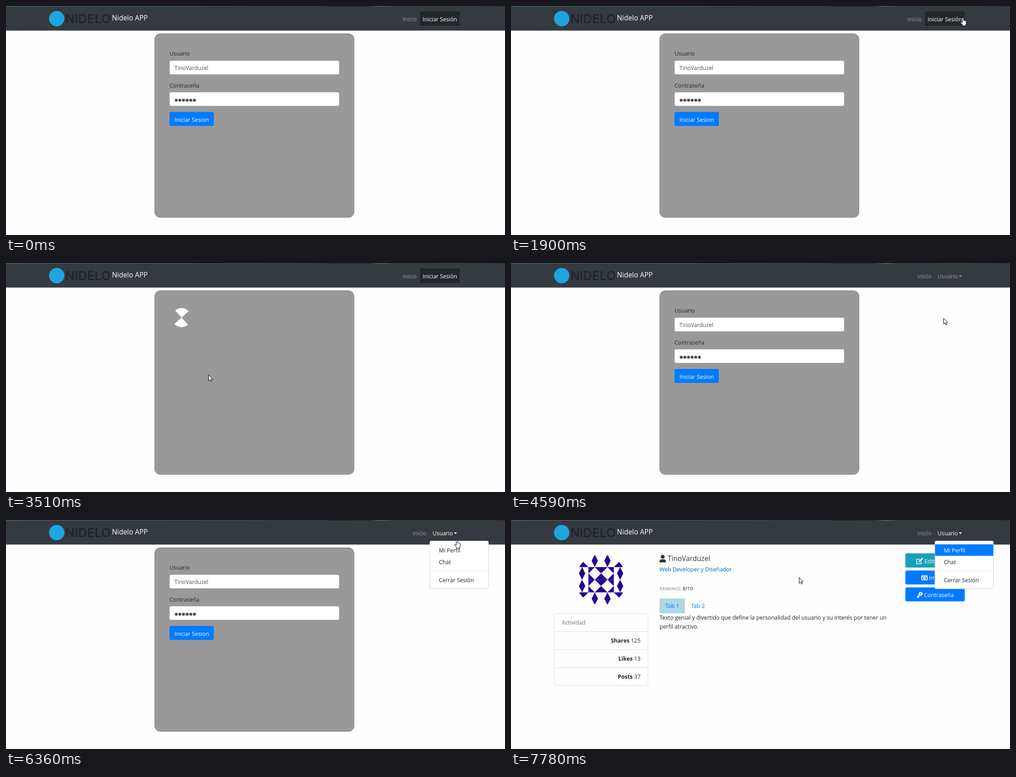
Animation of 1102 by 508 pixels, one loop 7.99 s. Source, as an HTML page:

```html
<!DOCTYPE html>
<html lang="es">
<head>
<meta charset="utf-8">
<title>Perfil</title>
<style>
html, body { margin: 0; width: 100%; height: 100%; overflow: hidden; background: #fefefe; }
svg { display: block; width: 100vw; height: 100vh; font: 12.35px "Open Sans", "Noto Sans", sans-serif; fill: #212529; }
.white { fill: #fff; }
.link { fill: #999c9f; }
.blue { fill: #007bff; }
.field { fill: #fff; stroke: #ced4da; }
.value { fill: #495057; }
.bold { font-weight: 700; }
.end { text-anchor: end; }
.line { fill: none; stroke: #dfdfdf; }
</style>
</head>
<body>
<svg viewBox="0 0 1102 508">
  <defs>
    <linearGradient id="strip">
      <stop offset="0" stop-color="#4a7f8c"/>
      <stop offset=".35" stop-color="#2f6474"/>
      <stop offset=".63" stop-color="#27434f"/>
      <stop offset=".65" stop-color="#15181c"/>
      <stop offset=".73" stop-color="#22262a"/>
      <stop offset=".75" stop-color="#94817c"/>
      <stop offset=".78" stop-color="#3a2f2e"/>
      <stop offset=".9" stop-color="#54403c"/>
      <stop offset="1" stop-color="#23262a"/>
    </linearGradient>
    <clipPath id="round"><circle r="56"/></clipPath>
  </defs>

  <rect width="1102" height="54.5" fill="#343a40"/>
  <rect width="1102" height="1" fill="url(#strip)"/>
  <circle cx="112" cy="28" r="17" fill="#1ea5e0"/>
  <text x="131" y="37.5" fill="#1f2327" style="font: 500 27.5px Inter, sans-serif">NIDELO</text>
  <text x="234" y="32" class="white" font-size="15.4">Nidelo APP</text>

  <g id="guestNav">
    <text id="guestHome" x="876" y="33.5" class="link">Inicio</text>
    <rect x="914" y="12" width="88" height="32" fill="#23272b"/>
    <text x="920" y="33.5" class="white">Iniciar Sesión</text>
  </g>
  <g id="userNav">
    <text id="userHome" x="898" y="33.5" class="link">Inicio</text>
    <g id="userLink" class="link">
      <text x="942" y="33.5">Usuario</text>
      <path d="M989 27.5h7l-3.5 3.7z"/>
    </g>
  </g>

  <g id="login">
    <rect x="328.5" y="61.5" width="440" height="407.5" rx="12" fill="#999" stroke="#7d7d7d"/>
    <g id="form">
      <text x="361" y="110">Usuario</text>
      <rect x="361.5" y="121.5" width="374" height="30" rx="3" class="field"/>
      <text x="372" y="142" class="value">TinoVarduzel</text>
      <text x="361" y="180.5">Contraseña</text>
      <rect x="361.5" y="191.5" width="374" height="30" rx="3" class="field"/>
      <path d="M376 209h40.1" stroke="#495057" stroke-width="6.6" stroke-linecap="round" stroke-dasharray="0 8"/>
      <rect id="submit" x="361" y="235" width="98" height="31" rx="3"/>
      <text x="372" y="256.5" class="white">Iniciar Sesion</text>
    </g>
    <path id="spinner" class="white" d="M0 0L-15-15A21.2 21.2 0 0 1 15-15L-15 15A21.2 21.2 0 0 0 15 15Z"/>
  </g>

  <g id="profile">
    <g id="avatar" transform="translate(199 132.5)" clip-path="url(#round)" fill="#28008f"></g>
    <rect x="95.5" y="207.5" width="207" height="159.5" rx="3" class="line"/>
    <path d="M95 247.5h208M95 287.5h208M95 327.5h208" class="line"/>
    <text x="112" y="232" fill="#6c757d">Actividad</text>
    <g class="end">
      <text x="286" y="272"><tspan class="bold">Shares</tspan> 125</text>
      <text x="286" y="312"><tspan class="bold">Likes</tspan> 13</text>
      <text x="286" y="352"><tspan class="bold">Posts</tspan> 37</text>
    </g>
    <g fill="#333">
      <circle cx="335" cy="81.5" r="4.3"/>
      <path d="M328 94v-2.5a4.3 4.3 0 0 1 4.3-4.3h5.4a4.3 4.3 0 0 1 4.3 4.3v2.5z"/>
      <text x="346" y="91" font-size="15.5">TinoVarduzel</text>
    </g>
    <text x="328" y="113.5" fill="#0062cc">Web Developer y Diseñador</text>
    <text x="328" y="156" font-size="9.4" fill="#818182">RANKINGS:</text>
    <text x="379" y="156" font-size="11">8/10</text>
    <rect x="328" y="174" width="56" height="33" fill="#add8e6"/>
    <text x="341" y="195" class="blue">Tab 1</text>
    <text x="397.5" y="195" class="blue">Tab 2</text>
    <text x="328" y="221">Texto genial y divertido que define la personalidad del usuario y su interés por tener un</text>
    <text x="328" y="241">perfil atractivo.</text>

    <rect x="871" y="74" width="131" height="31.5" rx="3" fill="#17a2b8"/>
    <rect x="871" y="112" width="131" height="31" rx="3" class="blue"/>
    <rect x="871" y="149.5" width="131" height="31" rx="3" class="blue"/>
    <g class="white">
      <text x="913" y="95.5">Editar Perfil</text>
      <text x="923" y="133">Imagen</text>
      <text x="912" y="170.5">Contraseña</text>
    </g>
    <g fill="none" stroke="#fff" stroke-width="1.7">
      <path d="M903 87h-7v10h10v-4.5"/>
      <path d="M901 93l8-8" stroke-width="3.4"/>
      <path d="M907 123.5h12v9.5h-12zM907 126h12"/>
      <circle cx="913" cy="129.3" r="2"/>
      <circle cx="904.7" cy="163.8" r="2.8" stroke-width="2.8"/>
      <path d="M902.5 166l-5.5 5.5M898 170.5l2.3 2" stroke-width="2.6"/>
    </g>
  </g>

  <g id="menu">
    <rect x="936" y="46.5" width="129.5" height="106" rx="3" fill="#fff" stroke="#d2d3d4"/>
    <rect id="menuItem" x="936.5" y="54" width="128.5" height="25.5"/>
    <path d="M936.5 112.5h128.5" stroke="#e9ecef"/>
    <text id="menuText" x="956" y="72">Mi Perfil</text>
    <text x="956" y="98">Chat</text>
    <text x="956" y="138">Cerrar Sesión</text>
  </g>

  <g id="pointer" fill="#fff" stroke="#000" stroke-linejoin="round">
    <path id="arrow" d="M.5.5v13l3-2.8 2 4.6 2.1-.9-2-4.5h3.8z"/>
    <path id="hand" d="M-1.5 11.5V2a1.5 1.5 0 0 1 3 0v5q1.4-.8 2.2.5 1.6-.7 2.1.8 1.6-.3 1.6 1.5v4l-1.4 3v2.2h-7v-2.2l-4-4.8q-1-2 .8-2.2z"/>
  </g>
</svg>
<script>
const LOOP = 7990;
const LOGIN = 3480, LOGGED = 4010, OPEN = 6000, PROFILE = 6760, AVATAR = 6940;
const $ = id => document.getElementById(id);
const show = (id, on) => { $(id).style.display = on ? '' : 'none'; };
const fill = (id, color) => { $(id).style.fill = color; };

// Pointer tip: time, x, y
const path = [
  [370, 985, 498], [520, 1024, 300], [660, 1000, 90], [820, 890, 28], [1140, 1010, 36],
  [1290, 1011, 37], [1450, 1062, 41], [1680, 895, 22], [1960, 1026, 26],
  [2250, 945, 42], [2510, 805, 79], [2780, 470, 211], [2820, 468, 213], [3060, 447, 248],
  [4310, 447, 248], [4590, 955, 122], [5080, 968, 28], [5330, 1002, 36], [5600, 887, 30],
  [5840, 966, 30], [6000, 966, 30], [6360, 996, 44], [6600, 990, 62], [6760, 994, 58],
  [7260, 994, 58], [7780, 636, 127], [LOOP, 636, 127]
];

function pointerAt(t) {
  const i = Math.max(1, path.findIndex(p => p[0] > t));
  const [t0, x0, y0] = path[i - 1], [t1, x1, y1] = path[i];
  const k = Math.max(0, (t - t0) / (t1 - t0));
  return [x0 + (x1 - x0) * k, y0 + (y1 - y0) * k];
}

// Tile pattern mirrored into the four quadrants
const tile = 'M0 0H28V28H0ZM14 0L0 14 14 28 28 14Z' +
  'M14-56L7-42 14-28 21-42Z' +
  'M14-28L7-42';
const sides = 'M14 28L21 42 14 56 7 42ZM42 0L49 14 42 28 35 14Z';
const corner = 'M28 28H56L42 42Z';
$('avatar').innerHTML = [[1, 1], [-1, 1], [1, -1], [-1, -1]].map(([x, y]) =>
  `<path fill-rule="evenodd" transform="scale(${x} ${y})" d="${tile.slice(0, 36)}${sides}${corner}"/>`).join('');

function draw(t) {
  const [x, y] = pointerAt(t);
  const over = (l, top, r, b) => t >= 370 && x >= l && x <= r && y >= top && y <= b;
  const logged = t >= LOGGED, open = t >= OPEN, profile = t >= PROFILE;
  const loading = t >= LOGIN && !logged;

  show('guestNav', !logged);
  show('userNav', logged);
  show('login', !profile);
  show('form', !loading);
  show('spinner', loading);
  show('profile', profile);
  show('avatar', t >= AVATAR);
  show('menu', open);
  $('spinner').setAttribute('transform', `translate(387.7 121) rotate(${(t - 3502) * .36})`);

  const onHome = logged ? over(891, 12, 936, 46) : over(870, 12, 914, 46);
  const onLink = logged ? over(936, 12, 1002, 46) : over(914, 12, 1002, 44);
  const onSubmit = !profile && !loading && over(361, 235, 459, 266);
  const onItem = open && over(936, 54, 1066, 79);
  const onButton = profile && over(871, 74, 936, 105);
  const homeColor = onHome ? '#ccced0' : '';
  fill('guestHome', homeColor);
  fill('userHome', homeColor);
  fill('userLink', open ? '#fff' : onLink ? '#ccced0' : '');
  fill('submit', onSubmit ? '#0069d9' : '#007bff');
  fill('menuItem', profile ? '#007bff' : onItem ? '#f8f9fa' : '#fff');
  fill('menuText', profile ? '#fff' : '');

  const hand = onHome || onLink || onSubmit || onItem || onButton;
  show('pointer', t >= 370);
  show('hand', hand);
  show('arrow', !hand);
  $('pointer').setAttribute('transform', `translate(${Math.round(x)} ${Math.round(y)})`);
}

function tick() {
  draw(performance.now() % LOOP);
  requestAnimationFrame(tick);
}
tick();
</script>
</body>
</html>
```
